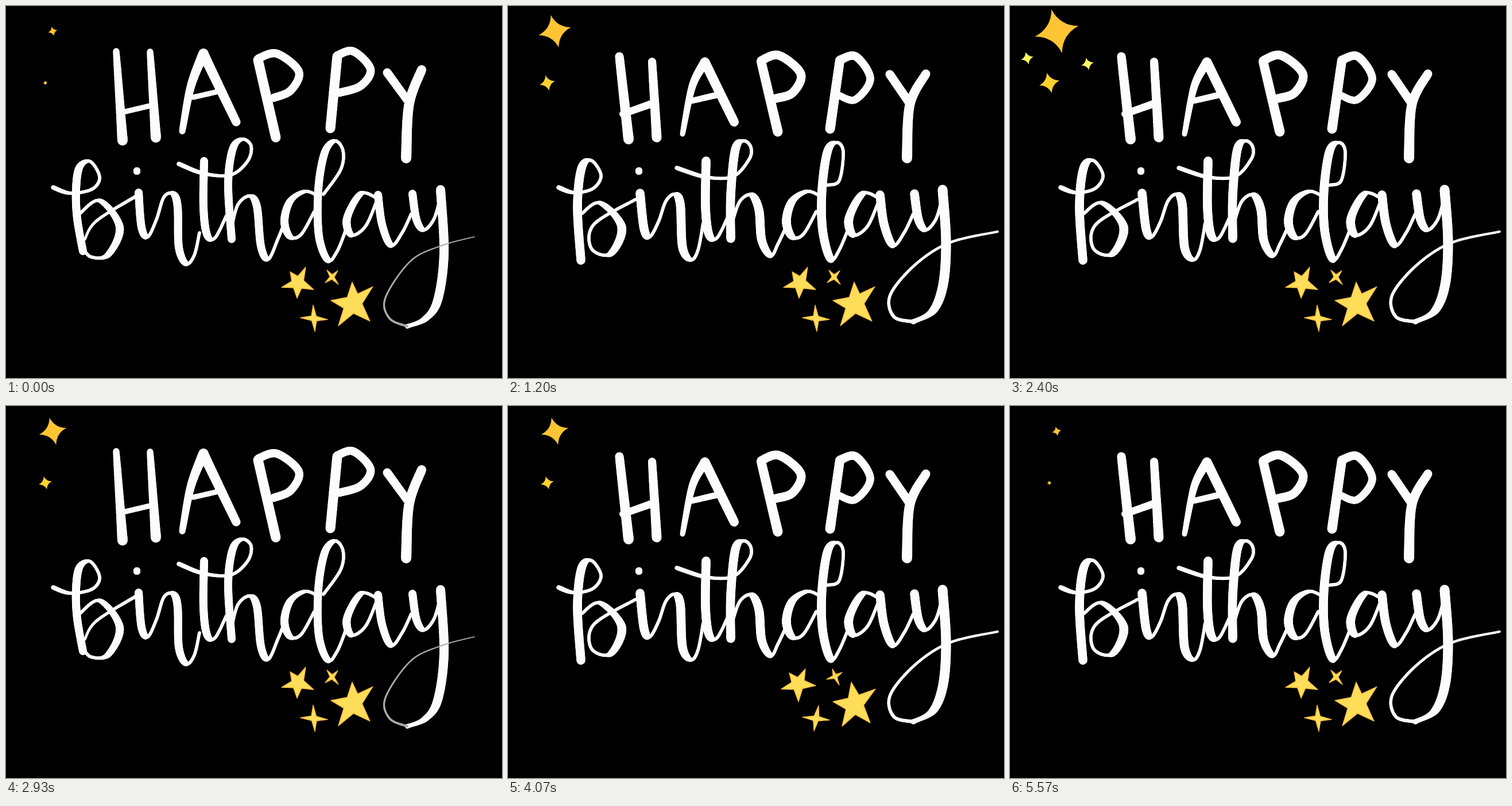
An HTML page with a canvas for the animation above (5.61 s loop, 864 by 648 pixels).

```html
<!DOCTYPE html>
<html lang="en">
<head>
<meta charset="utf-8">
<title>Happy birthday</title>
<style>
html, body { margin: 0; width: 100%; height: 100%; overflow: hidden; background: #000; }
canvas { display: block; }
</style>
</head>
<body>
<canvas id="stage" width="864" height="648"></canvas>
<script>
const W = 864, H = 648, LOOP = 5610, WHITE = '#fcfcfc';
const ctx = document.getElementById('stage').getContext('2d');

const points = text => text.match(/\S+ \S+/g).map(pair => pair.split(' ').map(Number));

// Catmull-Rom between b and c
const spline = (a, b, c, d, u) =>
  b + u / 2 * (c - a + u * (2 * a - 5 * b + 4 * c - d + u * (3 * (b - c) + d - a)));

// Draws a smooth line; width(progress, slope) gives the pen size, slope is 1 straight down.
function trace(g, text, width, color = WHITE) {
  const p = points(text), last = p.length - 1, steps = 20;
  let prev = p[0];
  g.strokeStyle = color;
  for (let i = 0; i < last; i++) {
    const near = [p[Math.max(i - 1, 0)], p[i], p[i + 1], p[Math.min(i + 2, last)]];
    for (let s = 1; s <= steps; s++) {
      const u = s / steps;
      const q = [0, 1].map(k => spline(...near.map(n => n[k]), u));
      const dx = q[0] - prev[0], dy = q[1] - prev[1];
      g.lineWidth = width((i + u) / last, dy / (Math.hypot(dx, dy) || 1));
      g.beginPath();
      g.moveTo(...prev);
      g.lineTo(...q);
      g.stroke();
      prev = q;
    }
  }
}

// Marker: width runs evenly from one end to the other.
const marker = (g, from, to, text, color) => trace(g, text, t => from + (to - from) * t, color);

// Calligraphy: thin when rising, thick when falling.
const script = (g, bold, text) =>
  trace(g, text, (t, slope) => 5.5 + (bold - 5.5) * Math.max(0, slope) ** 1.5);

function star(g, text) {
  const tips = points(text), n = tips.length;
  const mean = k => tips.reduce((sum, p) => sum + p[k], 0) / n;
  const cx = mean(0), cy = mean(1), dent = n === 5 ? 0.5 : 0.36;
  g.beginPath();
  tips.forEach(([x, y], i) => {
    const [nx, ny] = tips[(i + 1) % n];
    g.lineTo(x, y);
    g.lineTo(cx + ((x + nx) / 2 - cx) * dent, cy + ((y + ny) / 2 - cy) * dent);
  });
  g.closePath();
  g.fillStyle = '#fedd58';
  g.fill();
  g.lineWidth = 1.3;
  g.strokeStyle = '#f6b840';
  g.stroke();
}

function layer(paint) {
  const c = document.createElement('canvas');
  c.width = W;
  c.height = H;
  const g = c.getContext('2d');
  g.lineCap = g.lineJoin = 'round';
  paint(g);
  return c;
}

// Strokes that both letterings have in common
function shared(g, bold) {
  marker(g, 12, 12, '228 287 228 288');
  script(g, bold, '345 270 344 350 350 398 364 404 384 365');
  script(g, bold, '544 331 521 323 495 340 485 375 495 402 514 398 537 358');
  script(g, bold, '645 334 618 327 594 370 602 399 626 384 645 342');
  script(g, bold, '648 329 655 380 671 417 690 395 706 362');
  script(g, bold, '708 327 715 372 728 390 745 372 755 340');
}

function slimWords(g) {
  const pen = text => script(g, 14, text);
  // H
  marker(g, 11, 18, '192 79 203 234');
  marker(g, 11, 18, '251 80 261 229');
  marker(g, 9, 9, '208 184 250 174');
  // A
  marker(g, 18, 11, '344 83 322 140 307 218');
  marker(g, 18, 15, '344 84 401 202');
  marker(g, 9, 9, '326 159 374 148');
  // P
  marker(g, 17, 17, '439 94 470 229');
  marker(g, 14, 14, '440 91 472 83 510 114 496 147 466 160');
  // P
  marker(g, 17, 17, '577 88 565 213');
  marker(g, 14, 14, '577 86 605 79 635 110 618 139 581 151');
  // Y
  marker(g, 15, 14, '664 116 702 168');
  marker(g, 16, 18, '724 111 702 172 697 265');

  shared(g, 14);
  // b
  pen('82 316 112 326 150 319 163 298 147 271 128 281 122 320 124 370 134 427');
  pen('128 362 163 339 198 385 178 433 148 437 133 420');
  marker(g, 4, 6, '137 407 158 374 232 328');
  // i, n
  pen('231 325 236 385 247 402 262 372 275 333 291 327 299 350 301 420 314 449 328 434 337 395');
  // h
  pen('301 275 345 292 392 294 421 270 427 244 412 232 395 249 387 310 393 406');
  pen('393 385 404 346 424 331 437 349 444 418 457 441 474 405 484 380');
  // d
  pen('553 328 583 285 587 252 573 235 555 256 544 320 545 400 561 443 577 427 592 390');
  // y
  script(g, 16, '757 320 763 430 752 512 730 545 699 558');
  marker(g, 4, 1.5, '699 558 668 544 661 508 705 444 760 417 816 402', '#aaa');
}

function boldWords(g) {
  const pen = text => script(g, 15.5, text);
  // H
  marker(g, 15, 18, '194 88 210 232');
  marker(g, 14, 17, '251 97 259 229');
  marker(g, 12, 13, '200 188 251 170');
  // A
  marker(g, 17, 9, '343 98 321 140 304 223');
  marker(g, 17, 16, '343 98 394 202');
  marker(g, 10, 11, '321 165 368 154');
  // P
  marker(g, 16, 17, '441 97 470 219');
  marker(g, 15, 15, '441 95 472 86 510 118 496 151 467 161');
  // P
  marker(g, 16, 17, '578 95 561 214');
  marker(g, 15, 12, '578 94 606 88 631 127 605 163 577 156');
  // Y
  marker(g, 15, 15, '665 119 700 170');
  marker(g, 15, 18, '728 118 700 172 695 265');

  shared(g, 15.5);
  // b
  pen('88 316 115 325 148 318 162 295 145 269 128 283 121 350 127 443');
  pen('128 362 160 343 198 385 178 432 145 422 150 380 222 337');
  // i, n
  pen('230 326 237 388 247 402 262 376 275 340 290 328 300 345 304 420 319 442 331 425 340 378');
  // h
  pen('294 282 345 298 392 297 420 267 423 246 411 235 396 250 388 330 388 405');
  pen('391 375 404 340 424 329 437 355 442 408 458 435 470 415 482 390');
  // d
  pen('556 312 577 304 584 255 574 238 557 252 547 320 548 390 562 441 577 425 596 380');
  // y
  script(g, 17, '757 320 763 410 758 485 740 531 706 550');
  marker(g, 6, 4, '706 550 672 541 666 503 710 450 770 412 853 393');
}

function starsUp(g) {
  star(g, '522 455 536 494 507 509 480 490 495 463');
  star(g, '603 481 639 489 634 549 579 557 566 513');
  star(g, '559 460 578 461 579 485 556 482');
  star(g, '535 521 560 546 538 567 513 543');
}

function starsTilted(g) {
  star(g, '518 458 536 487 506 515 476 493 490 465');
  star(g, '598 481 640 493 631 552 582 558 566 515');
  star(g, '565 458 582 464 577 486 555 476');
  star(g, '541 522 560 547 533 566 513 542');
}

const words = [slimWords, boldWords].map(layer);
const stars = [starsUp, starsTilted].map(layer);

// Four-pointed sparkle with hollow sides, slightly turned
function sparkle(x, y, r, color) {
  if (r < 0.5) return;
  const tip = i => {
    const a = i * Math.PI / 2 - 1.81;
    return [Math.cos(a) * r * 1.03, Math.sin(a) * r * 1.03];
  };
  ctx.beginPath();
  ctx.moveTo(x + tip(0)[0], y + tip(0)[1]);
  for (let i = 0; i < 4; i++) {
    const [ax, ay] = tip(i), [bx, by] = tip(i + 1);
    ctx.quadraticCurveTo(x + (ax + bx) * 0.2, y + (ay + by) * 0.2, x + bx, y + by);
  }
  ctx.fillStyle = color;
  ctx.fill();
}

function draw(now) {
  // 25 steps a second shown on a 30 Hz clock
  const tick = Math.floor((now % LOOP + 3.4) / (100 / 3));
  const step = Math.min(139, Math.floor(tick / 1.2 + 1e-6));

  ctx.fillStyle = '#000';
  ctx.fillRect(0, 0, W, H);
  ctx.drawImage(words[Math.floor((step + 1) / 4) % 2], 0, 0);
  ctx.drawImage(stars[Math.floor(step / 3) % 2], 0, 0);

  const k = step % 35;
  const gold = 8 + 30 * Math.abs(Math.sin(Math.PI * k / 17));
  const lemon = Math.max(0, 19.8 * Math.cos(Math.PI * (k - 16.7) / 26));
  sparkle(81.5, 44, gold, '#fec433');
  sparkle(68.5, 134, gold * 0.47, '#fed22f');
  sparkle(30, 91, lemon, '#feff60');
  sparkle(135, 101, lemon, '#feff60');
}

const start = performance.now();
(function loop() {
  draw(performance.now() - start);
  requestAnimationFrame(loop);
})();
</script>
</body>
</html>
```
